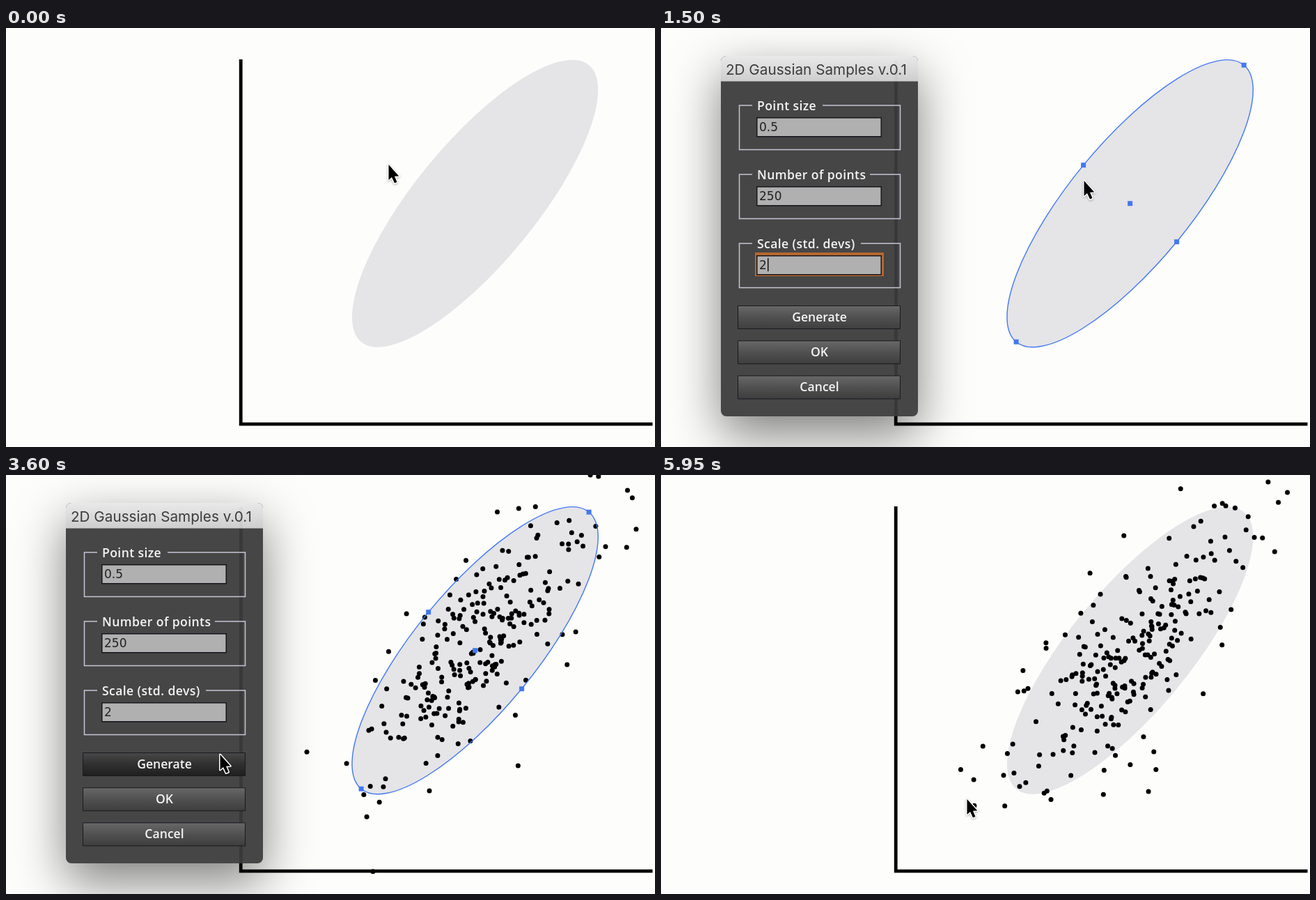
An HTML page with a canvas for the animation above (6000 ms loop, 932 by 601 pixels).

```html
<!DOCTYPE html>
<html lang="en">
<head>
<meta charset="utf-8">
<title>2D Gaussian Samples</title>
<style>
html, body { margin: 0; width: 100%; height: 100%; overflow: hidden; background: #fdfdfb; }
canvas { display: block; }
</style>
</head>
<body>
<canvas id="stage" width="932" height="601"></canvas>
<script>
const ctx = document.getElementById('stage').getContext('2d');
const LOOP = 6000;
const UI = '20.7px Inter, sans-serif';
const LABEL = '600 17.6px "Open Sans", sans-serif';
const FIELD = '17px "DejaVu Sans", sans-serif';

// Ellipse: centre plus its two half axes
const C = [673.6, 251.7], A = [163.5, -198.5], B = [67, 55];
const onAxes = (u, v) => [C[0] + u * A[0] + v * B[0], C[1] + u * A[1] + v * B[1]];

function randomizer(seed) {
  return () => {
    seed = (seed + 0x6D2B79F5) | 0;
    let x = Math.imul(seed ^ (seed >>> 15), 1 | seed);
    x ^= x + Math.imul(x ^ (x >>> 7), 61 | x);
    return ((x ^ (x >>> 14)) >>> 0) / 4294967296;
  };
}

// 250 normal samples; the ellipse marks two standard deviations
function sampleSet(seed) {
  const rand = randomizer(seed);
  return Array.from({ length: 250 }, () => {
    const r = Math.sqrt(-2 * Math.log(1 - rand())) / 2, a = 2 * Math.PI * rand();
    return onAxes(r * Math.cos(a), r * Math.sin(a));
  });
}

// One new set per click on Generate
const samples = [1950, 2800, 3450, 4100].map(start => ({ start, points: sampleSet(start) }));

const moves = [
  { from: 50, to: 300, dx: 58, dy: 23 },
  { from: 1500, to: 1850, dx: -300, dy: 182 },
  { from: 4200, to: 4500, dx: -8, dy: 69 },
  { from: 4850, to: 5350, dx: 140, dy: -5 }
];

function pointerAt(t) {
  let x = 548.5, y = 196;
  for (const m of moves) {
    const p = Math.min(1, Math.max(0, (t - m.from) / (m.to - m.from))), e = p * p * (3 - 2 * p);
    x += m.dx * e;
    y += m.dy * e;
  }
  return [x, y];
}

function rect(x, y, w, h, fill) {
  ctx.fillStyle = fill;
  ctx.fillRect(x, y, w, h);
}

function box(x, y, w, h, r, fill, stroke) {
  ctx.beginPath();
  ctx.roundRect(x, y, w, h, r);
  ctx.fillStyle = fill;
  ctx.fill();
  if (!stroke) return;
  ctx.strokeStyle = stroke;
  ctx.lineWidth = 1;
  ctx.stroke();
}

function line(points, color, width) {
  ctx.beginPath();
  points.forEach(p => ctx.lineTo(...p));
  ctx.strokeStyle = color;
  ctx.lineWidth = width;
  ctx.stroke();
}

function text(s, x, y, font, color, align = 'left') {
  ctx.font = font;
  ctx.fillStyle = color;
  ctx.textAlign = align;
  ctx.fillText(s, x, y);
}

function vertical(y0, y1, ...colors) {
  const g = ctx.createLinearGradient(0, y0, 0, y1);
  colors.forEach((c, i) => g.addColorStop(i / (colors.length - 1), c));
  return g;
}

function shadowed(draw) {
  ctx.save();
  ctx.shadowColor = 'rgba(0,0,0,.5)';
  ctx.shadowBlur = 70;
  ctx.shadowOffsetY = 26;
  draw();
  ctx.restore();
}

function ellipsePath() {
  ctx.beginPath();
  ctx.ellipse(...C, Math.hypot(...A), Math.hypot(...B), Math.atan2(A[1], A[0]), 0, 2 * Math.PI);
}

function drawPlot(t) {
  rect(0, 0, 932, 601, '#fdfdfb');
  ellipsePath();
  ctx.fillStyle = '#e5e4e7';
  ctx.fill();
  line([[337.2, 45], [337.2, 568.2], [928.5, 568.2]], '#000', 4.8);

  const set = samples.findLast(s => t >= s.start);
  ctx.fillStyle = '#000';
  for (const [x, y] of set ? set.points : []) {
    ctx.beginPath();
    ctx.arc(x, y, 3.5, 0, 2 * Math.PI);
    ctx.fill();
  }

  if (t < 400 || t >= 5450) return;
  ellipsePath();
  ctx.strokeStyle = '#4378f2';
  ctx.lineWidth = 1.4;
  ctx.stroke();
  for (const [u, v] of [[0, 0], [1, 0], [-1, 0], [0, 1], [0, -1]]) {
    const [x, y] = onAxes(u, v);
    rect(x - 3.5, y - 3.5, 7, 7, '#4378f2');
  }
}

function drawFileDialog() {
  shadowed(() => box(-60, -60, 935.5, 550.5, 8, '#d2d2d2', '#a0a0a0'));
  box(-60, 400, 935.5, 90.5, 8, vertical(423, 490, '#e6e6e6', '#cecece'), '#a0a0a0');
  rect(0, 0, 875, 367, '#fdfdfc');
  rect(162.5, 0, 1, 367, '#d2d2d2');
  rect(0, 367, 875, 56, '#cbcbcb');
  rect(0, 367, 875, 1, '#a8a8a8');
  rect(0, 422.5, 875, 1, '#a8a8a8');

  text('Enable:', 152, 403, UI, '#1c1c1c', 'right');
  box(165.5, 378.5, 203, 32, 5, '#fefefe', '#b0b0b0');
  box(342.5, 378, 27, 32.5, [0, 5, 5, 0], vertical(378, 410, '#f063b1', '#e91e86'));
  line([[350.5, 390.5], [356, 385], [361.5, 390.5]], '#fff', 2.2);
  line([[350.5, 398.5], [356, 404], [361.5, 398.5]], '#fff', 2.2);
  text('Script Files', 179, 403, UI, '#1c1c1c');

  box(594, 441.5, 124, 32, 5, '#fefefe', '#b4b4b4');
  text('Cancel', 656, 465, UI, '#1c1c1c', 'center');
  box(733.5, 441.5, 124.5, 32, 5, '#dedede', '#bdbdbd');
  text('Open', 795.5, 465, UI, '#a9a9a9', 'center');
}

function drawField(label, value, gapEnd, y, focused) {
  line([[131, y], [112.5, y], [112.5, y + 63.5], [343.5, y + 63.5], [343.5, y], [gapEnd, y]], '#c5c5d6', 1.5);
  ctx.letterSpacing = '0.4px';
  text(label, 138, y + 7, LABEL, '#f4f4f4');
  ctx.letterSpacing = '0px';
  if (focused) rect(135, y + 13, 185, 34, '#b5682e');
  rect(137, y + 17, 180, 28.5, '#15151c');
  rect(138.5, y + 18.5, 177, 25.5, '#b0b0b0');
  text(value, 141, y + 37, FIELD, '#222');
  if (focused) rect(153, y + 21, 1.5, 19, '#111');
}

function drawPanel(t) {
  shadowed(() => box(86, 40, 283, 517, 8, '#464646'));
  box(86, 40, 283, 36.5, [8, 8, 0, 0], vertical(40, 76, '#e9e9e9', '#cecece'));
  text('2D Gaussian Samples v.0.1', 93, 66.5, UI, '#3c3c3c');
  rect(335, 46, 5, 30, 'rgba(0,0,0,.03)');
  rect(335, 77, 5, 480, 'rgba(0,0,0,.18)');

  drawField('Point size', '0.5', 232, 111, false);
  drawField('Number of points', '250', 300, 210, false);
  drawField('Scale (std. devs)', '2', 287, 309, t < 1900);

  const hovered = t < 1800 ? -1 : t < 4350 ? 0 : 1;
  ['Generate', 'OK', 'Cancel'].forEach((name, i) => {
    const y = 398.5 + 50.2 * i;
    const fill = i === hovered ? ['#484848', '#303030', '#1f1f1f'] : ['#686868', '#505050', '#3e3e3e'];
    box(110.5, y, 233, 33, 0, vertical(y, y + 33, ...fill), '#191922');
    text(name, 227.5, y + 22.5, LABEL, '#f4f4f4', 'center');
  });

  if (t >= 2200 && t < 2700) {
    box(276, 440, 87.5, 33.5, 3, '#e9e9e9', '#cfcfcf');
    text('Generate', 319.5, 462, '15px Inter, sans-serif', '#707070', 'center');
  }
}

function drawPointer(t) {
  ctx.save();
  ctx.translate(...pointerAt(t));
  ctx.beginPath();
  [[1, 0], [1, 22], [5.5, 18], [9.5, 26.5], [13, 25], [9.5, 16.7], [15.8, 16.4]].forEach(p => ctx.lineTo(...p));
  ctx.closePath();
  ctx.lineJoin = 'round';
  ctx.strokeStyle = '#fff';
  ctx.lineWidth = 3;
  ctx.shadowColor = 'rgba(0,0,0,.3)';
  ctx.shadowBlur = 3;
  ctx.shadowOffsetY = 1;
  ctx.stroke();
  ctx.shadowColor = 'transparent';
  ctx.fillStyle = '#000';
  ctx.fill();
  ctx.restore();
}

function frame() {
  const t = performance.now() % LOOP;
  drawPlot(t);
  if (t >= 850 && t < 1250) drawFileDialog();
  if (t >= 1300 && t < 4800) drawPanel(t);
  drawPointer(t);
  requestAnimationFrame(frame);
}
frame();
</script>
</body>
</html>
```
